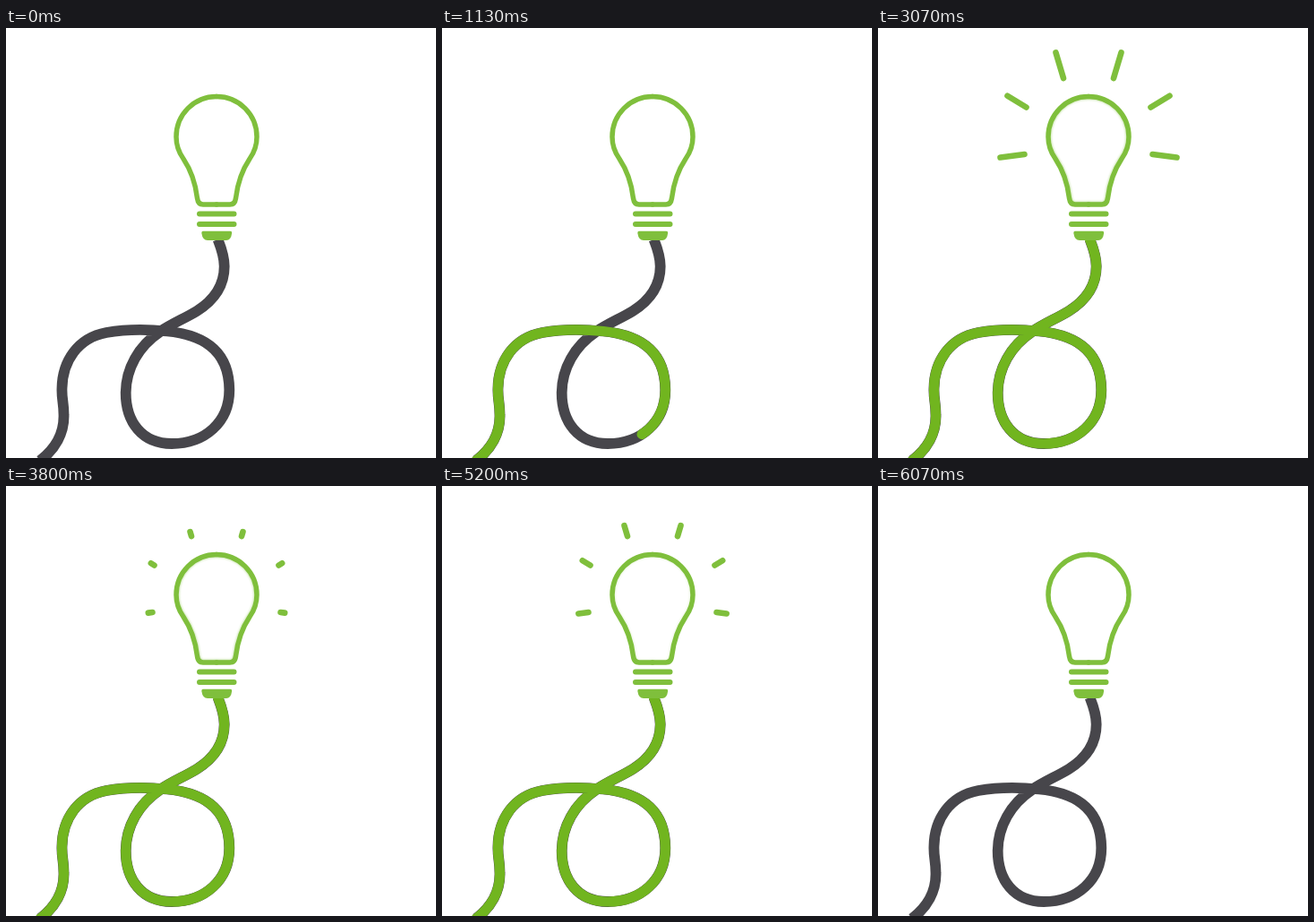
An HTML page that plays this animation: 480x480 px, repeating every 6340 ms.

```html
<!DOCTYPE html>
<html lang="en">
<head>
<meta charset="utf-8">
<title>Light bulb</title>
<style>
  html, body { margin: 0; width: 100%; height: 100%; overflow: hidden; background: #fff; }
  svg { display: block; width: 100vw; height: 100vh; }
  .line { fill: none; stroke: #7fbf3c; stroke-linecap: round; }
  .cable { fill: none; stroke: #47464b; stroke-width: 11.8; }
  #power { stroke: #71b51f; stroke-width: 11.2; stroke-linecap: round; }
</style>
</head>
<body>
<svg viewBox="0 0 480 480">
  <defs>
    <path id="cord" pathLength="1" d="M38 483 C55 470 65 452 64.5 432 C64.5 418 62 414 62.5 402
      C63 372 80 346 112 340 C135 336 160 336.5 180 338.5 C215 342 249 356 249.3 404
      C249.3 440 222 464 185 464 C152 464 133.7 440 133.7 407 C134 380 148 355 172 339
      C185 330 200 324 213 316 C232 304 243.7 287 243.7 266 C243.7 254 240 245 236.5 236"/>
    <path id="half" d="M235 76.5 C210 76.5 190 96.5 190 121.5 C190 131 193 139 198 146
      C206 158 211.5 173 213.5 190 Q214.5 197 220 197 H235"/>
    <g id="glass"><use href="#half"/><use href="#half" transform="matrix(-1 0 0 1 470 0)"/></g>
    <clipPath id="inside">
      <use href="#half"/><use href="#half" transform="matrix(-1 0 0 1 470 0)"/>
    </clipPath>
    <filter id="soft"><feGaussianBlur stdDeviation="1.2"/></filter>
  </defs>
  <use href="#cord" class="cable"/>
  <use href="#cord" class="cable" id="power"/>
  <g clip-path="url(#inside)">
    <use href="#glass" class="line" id="glow" stroke-width="7" filter="url(#soft)"/>
  </g>
  <use href="#glass" class="line" stroke-width="5.5"/>
  <path class="line" stroke-width="6" d="M216 207.5H254.5M216 218.9H254.5"/>
  <path fill="#7fbf3c" d="M220 226.8H250.5Q252.3 226.8 252.2 229Q251 237 246 237H225Q219.5 237 218.3 229Q218.2 226.8 220 226.8Z"/>
  <g id="rays" class="line" stroke-width="6.6">
    <g id="side">
      <path pathLength="1" d="M163.5 141L136.5 144.5"/>
      <path pathLength="1" d="M165.5 88.5L144.5 75.8"/>
      <path pathLength="1" d="M207 56L198.5 27.5"/>
    </g>
    <use href="#side" transform="matrix(-1 0 0 1 470 0)"/>
  </g>
</svg>
<script>
const LOOP = 6340, STEP = 1000 / 15;
const BLINK = 230, OFF = 375, PERIOD = 840;
const $ = id => document.getElementById(id);

// Rises from 0 to 1 over a duration.
const ramp = (t, from, duration) => Math.min(1, Math.max(0, (t - from) / duration));

// Rays come on, blink twice, then go out for good.
function shineAt(t) {
  let shine = ramp(t, 2740, BLINK);
  for (let k = 0; k < 3; k++) {
    const off = 3385 + k * PERIOD;
    shine -= ramp(t, off, BLINK);
    if (k < 2) shine += ramp(t, off + OFF, BLINK);
  }
  return shine;
}

// Shows the given part of a stroke, measured from its start.
function trim(el, part) {
  el.style.strokeDasharray = `${part} 2`;
  el.style.visibility = part > 0.001 ? 'visible' : 'hidden';
}

function show(t) {
  trim($('power'), ramp(t, 213, 1700) - ramp(t, 5270, 790));
  trim($('rays'), shineAt(t));
  $('glow').style.opacity = 0.4 * (ramp(t, 2130, 600) - ramp(t, 5065, BLINK));
}

const start = performance.now();
function tick() {
  const t = (performance.now() - start) % LOOP;
  show(Math.floor((t + 4) / STEP) * STEP);
  requestAnimationFrame(tick);
}
tick();
</script>
</body>
</html>
```
